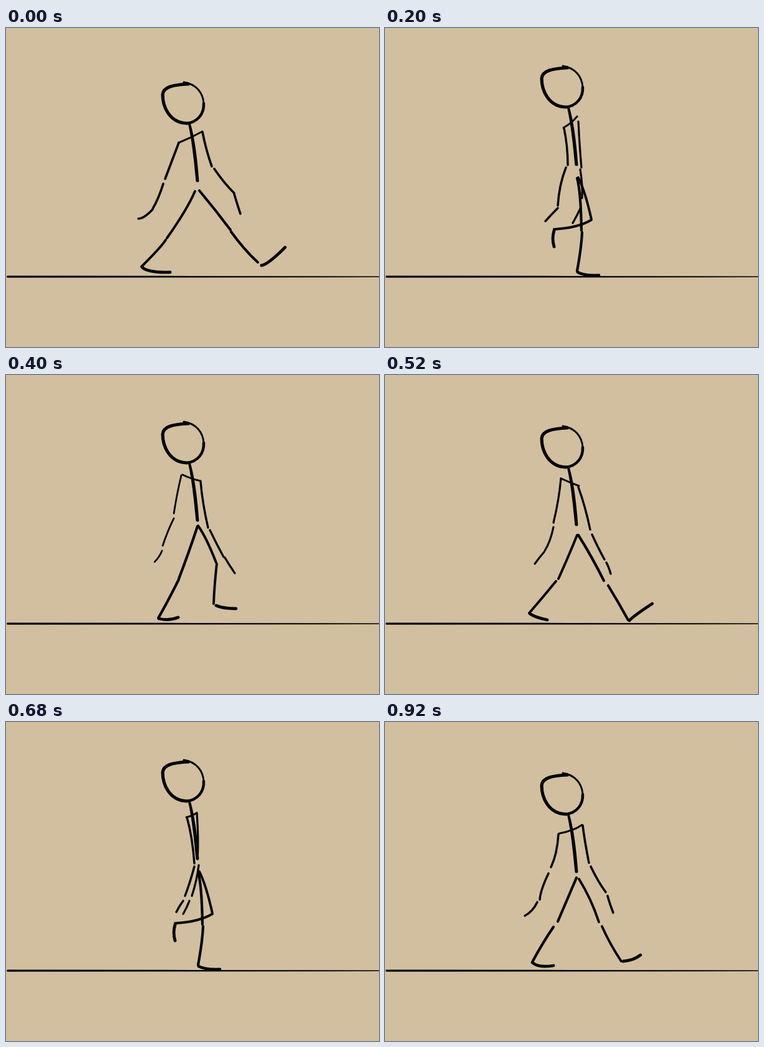
Write an HTML page without scripts that moves like this. It is 600 by 512 pixels and loops after 960 ms.

```html
<!DOCTYPE html>
<html lang="en">
<head>
<meta charset="utf-8">
<title>Walk cycle</title>
<style>
html, body { margin: 0; width: 100%; height: 100%; overflow: hidden; background: #d1bfa0; }
svg { display: block; width: 100%; height: 100%; }
path { fill: none; stroke: #040505; stroke-linecap: round; stroke-linejoin: round; }
.solid { fill: #040505; stroke: none; }

/* Legs and body repeat every step, arms every two steps. */
.step { animation: 480ms -1ms infinite; }
.stride { animation: 960ms -1ms infinite; }
.bob { animation-name: bob; }
.stance { animation-name: stance; stroke-width: 4.2px; }
.stance-foot { animation-name: stance-foot; stroke-width: 4.8px; }
.swing { animation-name: swing; stroke-width: 3.9px; }
.swing-foot { animation-name: swing-foot; stroke-width: 4.8px; }
.back-arm { animation-name: back-arm; }
.front-arm { animation-name: front-arm; }
.shoulders { animation-name: shoulders; stroke-width: 3px; }

@keyframes bob {
  0%, 100% { transform: translateY(0); animation-timing-function: steps(1); }
  8.333% { transform: translateY(-5px); animation-timing-function: steps(1); }
  16.666% { transform: translateY(-12px); animation-timing-function: steps(1); }
  25% { transform: translateY(-22px); animation-timing-function: steps(1); }
  33.333% { transform: translateY(-33px); animation-timing-function: steps(1); }
  41.666% { transform: translateY(-26px); animation-timing-function: steps(2); }
  58.333% { transform: translateY(-19px); animation-timing-function: steps(3); }
  83.333% { transform: translateY(-12px); animation-timing-function: steps(1); }
  91.666% { transform: translateY(-5px); animation-timing-function: steps(1); }
}
@keyframes stance {
  0%, 100% { d: path("M311 261Q337 292 361 324M362 327Q384 357 405 376"); animation-timing-function: steps(1); }
  8.333% { d: path("M311 257Q332 290 352 330M359 338Q375 364 391 393"); animation-timing-function: steps(4); }
  41.666% { d: path("M309 241Q315 262 316 325M317 328Q316 352 309 390"); animation-timing-function: steps(2); }
  58.333% { d: path("M309 238Q308 280 294 313M294 318Q287 352 273 384"); animation-timing-function: steps(3); }
  83.333% { d: path("M308 243Q303 266 291 288T278 327M278 328Q262 362 245 390"); animation-timing-function: steps(1); }
  83.333% { d: path("M308 243Q293 288 278 327M278 328Q259 366 245 390"); animation-timing-function: steps(1); }
  91.666% { d: path("M308 250Q296 278 278 320M271 329Q255 352 237 385"); animation-timing-function: steps(1); }
}
@keyframes stance-foot {
  0%, 100% { d: path("M411 381Q421 380 449 352"); animation-timing-function: steps(1); }
  8.333% { d: path("M393 394Q402 385 430 367"); animation-timing-function: steps(4); }
  41.666% { d: path("M310 392Q320 398 344 397"); animation-timing-function: steps(2); }
  58.333% { d: path("M272 392Q282 399 302 388"); animation-timing-function: steps(3); }
  83.333% { d: path("M246 391Q262 395 277 389"); animation-timing-function: steps(1); }
  91.666% { d: path("M237 386Q247 395 271 391"); animation-timing-function: steps(1); }
}
@keyframes swing {
  0%, 100% { d: path("M304 262Q291 292 259 337M257 340Q251 350 218 383"); animation-timing-function: steps(1); }
  8.333% { d: path("M309 257Q297 287 279 327M275 331Q253 358 232 382"); animation-timing-function: steps(4); }
  41.666% { d: path("M311 240Q322 262 332 307M332 308Q310 321 272 323"); animation-timing-function: steps(2); }
  58.333% { d: path("M309 238Q325 266 334 304M334 307Q312 328 305 350"); animation-timing-function: steps(3); }
  83.333% { d: path("M309 242Q322 260 338 301M339 303Q335 340 334 367"); animation-timing-function: steps(1); }
  91.666% { d: path("M312 252Q332 284 344 321M349 328Q362 357 380 384"); animation-timing-function: steps(1); }
}
@keyframes swing-foot {
  0%, 100% { d: path("M219 384Q228 393 264 392"); animation-timing-function: steps(1); }
  8.333% { d: path("M233 383Q241 389 261 393"); animation-timing-function: steps(4); }
  41.666% { d: path("M272 325Q268 338 272 351"); animation-timing-function: steps(2); }
  58.333% { d: path("M304 357Q311 372 332 376"); animation-timing-function: steps(3); }
  83.333% { d: path("M338 370Q350 375 370 375"); animation-timing-function: steps(1); }
  91.666% { d: path("M383 384Q399 383 411 374"); animation-timing-function: steps(1); }
}
@keyframes back-arm {
  0%, 100% { stroke-width: 3.7px; d: path("M278 184Q267 213 256 242M253 250Q245 275 236 290M236 291Q222 306 213 306"); animation-timing-function: steps(5); }
  20.833% { stroke-width: 3.5px; d: path("M288 161Q294 190 294 220M291 224Q280 252 278 285M278 289Q268 299 258 310"); animation-timing-function: steps(1); }
  25% { stroke-width: 3.3px; d: path("M291 153Q300 185 303 227M303 232Q296 258 288 279M285 287Q279 295 274 305"); animation-timing-function: steps(4); }
  41.666% { stroke-width: 2.8px; d: path("M282 161Q275 190 270 222M270 230Q260 250 252 274M251 282Q247 292 239 300"); animation-timing-function: steps(3); }
  54.166% { stroke-width: 3.2px; d: path("M283 166Q280 200 271 237M271 244Q266 268 257 282M256 284Q249 292 241 303"); animation-timing-function: steps(4); }
  70.833% { stroke-width: 3.5px; d: path("M291 153Q300 185 303 227M303 232Q296 258 288 279M285 287Q279 295 274 305"); animation-timing-function: steps(2); }
  79.166% { stroke-width: 2.8px; d: path("M288 167Q290 195 290 222M289 232Q284 260 276 285M272 292Q268 300 260 310"); animation-timing-function: steps(4); }
  95.833% { stroke-width: 3.5px; d: path("M279 180Q277 212 267 233M263 243Q250 270 249 285M245 289Q238 304 225 311"); animation-timing-function: steps(1); }
}
@keyframes front-arm {
  0%, 100% { stroke-width: 3.7px; d: path("M316 167Q322 197 331 222M335 226Q350 248 367 265M367 266Q371 280 377 298"); animation-timing-function: steps(5); }
  20.833% { stroke-width: 3.2px; d: path("M311 150Q313 190 316 224M314 227Q318 250 317 273M314 290Q309 301 302 313"); animation-timing-function: steps(1); }
  25% { stroke-width: 3.2px; d: path("M307 146Q310 190 308 220M310 230Q307 255 299 279M295 287Q291 298 285 308"); animation-timing-function: steps(4); }
  41.666% { stroke-width: 3.4px; d: path("M313 171Q316 206 325 245M328 249Q339 272 350 292M352 293Q359 305 368 318"); animation-timing-function: steps(3); }
  54.166% { stroke-width: 3.5px; d: path("M311 180Q322 210 330 248M333 256Q343 278 353 296M356 301Q360 308 363 319"); animation-timing-function: steps(4); }
  70.833% { stroke-width: 3.3px; d: path("M307 146Q310 190 308 220M310 230Q307 255 299 279M295 287Q291 298 285 308"); animation-timing-function: steps(2); }
  79.166% { stroke-width: 3px; d: path("M313 145Q314 190 316 224M315 229Q315 255 310 279M307 285Q300 302 292 313"); animation-timing-function: steps(4); }
  95.833% { stroke-width: 3.6px; d: path("M318 166Q321 190 328 226M331 232Q343 257 355 273M358 279Q361 290 367 306"); animation-timing-function: steps(1); }
}
@keyframes shoulders {
  0%, 100% { d: path("M278 184Q298 176 316 166"); animation-timing-function: steps(5); }
  20.833% { d: path("M287 160Q299 154 309 142"); animation-timing-function: steps(1); }
  25% { d: path("M290 148Q299 150 307 152"); animation-timing-function: steps(4); }
  41.666% { d: path("M284 160Q298 167 313 170"); animation-timing-function: steps(3); }
  54.166% { d: path("M283 166Q298 173 312 178"); animation-timing-function: steps(4); }
  70.833% { d: path("M290 153Q299 151 307 146"); animation-timing-function: steps(2); }
  79.166% { d: path("M288 166Q306 158 313 146"); animation-timing-function: steps(4); }
  95.833% { d: path("M280 179Q305 174 317 165"); animation-timing-function: steps(1); }
}
</style>
</head>
<body>
<svg viewBox="0 0 600 512">
  <path class="solid" d="M2 397.6L300 397.9L600 398.5V400L300 400.5L2 400.8Q0 399 2 397.6Z"/>
  <g class="step bob">
    <path stroke-width="5.2" d="M293 90C270 91 253 94 252 107C252 125 262 152 291 153"/>
    <path stroke-width="4.5" d="M291 153C308 151 319 138 318 121"/>
    <path stroke-width="2.9" d="M318 121C317 104 306 90 286 87"/>
    <path class="solid" d="M293 154Q298 176 302 212L305.500 246Q308 249 310.500 246Q306 185 297 154Z"/>
  </g>
  <path class="stride shoulders"/>
  <path class="stride back-arm"/>
  <path class="stride front-arm"/>
  <path class="step swing"/>
  <path class="step swing-foot"/>
  <path class="step stance"/>
  <path class="step stance-foot"/>
</svg>
</body>
</html>
```
